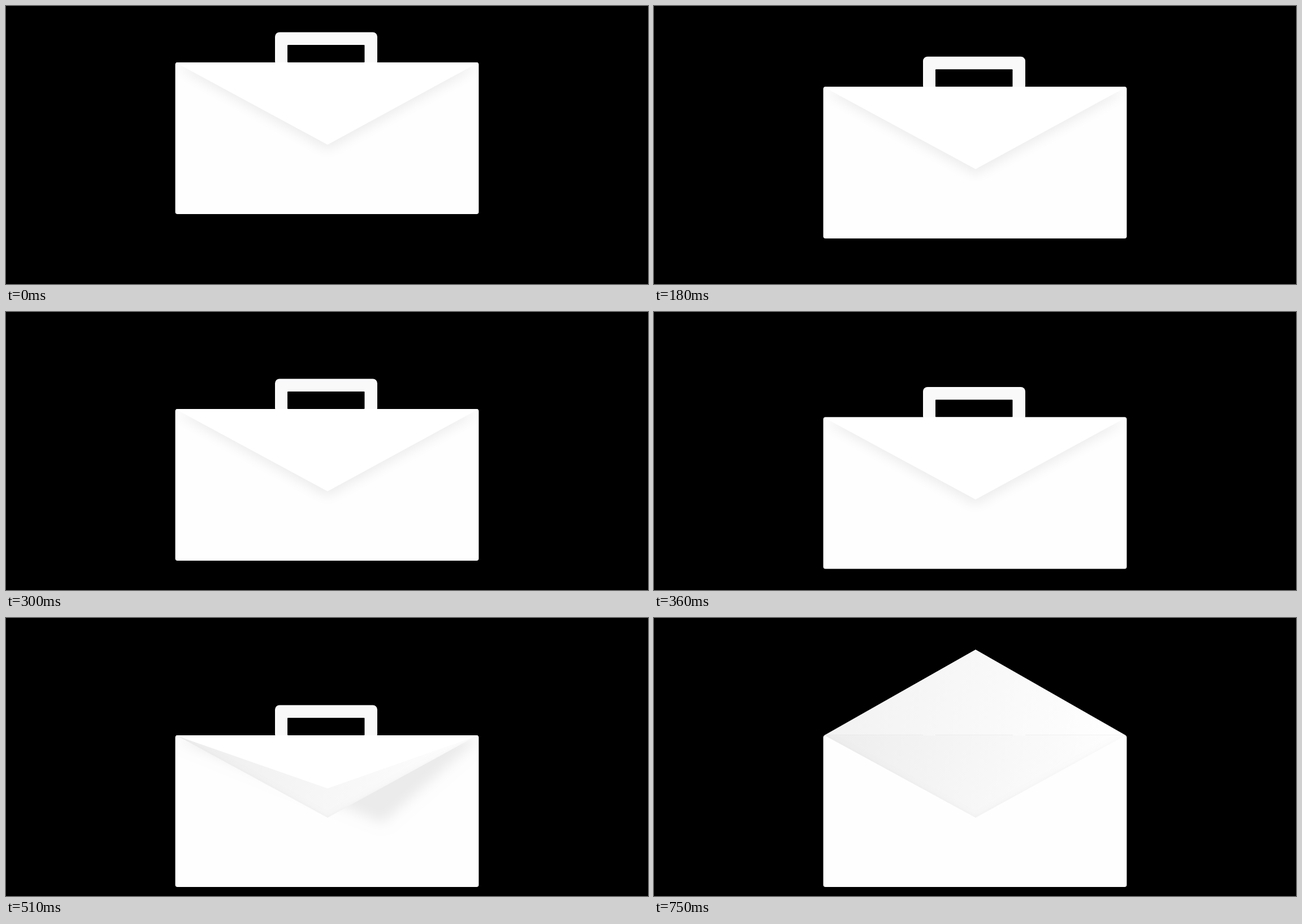
Recreate the animation shown at these times as an HTML page with a canvas. Size 1136 px wide and 493 px high, loop 1350 ms.

```html
<!DOCTYPE html>
<html lang="en">
<head>
<meta charset="utf-8">
<title>Envelope</title>
<style>
html, body { margin: 0; width: 100%; height: 100%; overflow: hidden; background: #000; }
canvas { display: block; }
</style>
</head>
<body>
<canvas id="stage" width="1136" height="493"></canvas>
<script>
const ctx = document.getElementById('stage').getContext('2d');
const LOOP = 1350, STEP = 30, LAST = 750;
const DROP_END = 450, OPEN_TIME = 300;
const L = 299.5, R = 836.5, MID = 569, BODY_H = 269, FOLD = 146;
const FAR = 3000; // shadow casters are drawn this far off stage

// cubic-bezier(.25, .1, .25, 1), solved by bisection
function ease(x) {
  if (x <= 0) return 0;
  if (x >= 1) return 1;
  const curve = (a, b, u) => 3 * a * u * (1 - u) ** 2 + 3 * b * u * u * (1 - u) + u ** 3;
  let lo = 0, hi = 1;
  for (let i = 0; i < 30; i++) {
    const u = (lo + hi) / 2;
    if (curve(.25, .25, u) < x) lo = u; else hi = u;
  }
  return curve(.1, 1, lo);
}

function poly(...pts) {
  ctx.beginPath();
  pts.forEach(([x, y]) => ctx.lineTo(x, y));
  ctx.closePath();
}

function box(x, y, w, h, r) {
  ctx.beginPath();
  ctx.roundRect(x, y, w, h, r);
}

function paint(color) {
  ctx.fillStyle = color;
  ctx.fill();
}

function shade(top, from, to) {
  const g = ctx.createLinearGradient(300, top, 785, top + 153);
  g.addColorStop(0, from);
  g.addColorStop(1, to);
  return g;
}

function castShadow(blur, alpha) {
  ctx.shadowColor = `rgba(0,0,0,${alpha})`;
  ctx.shadowBlur = blur;
  ctx.shadowOffsetX = FAR;
  paint('#000');
}

function clipped(path, draw) {
  ctx.save();
  path();
  ctx.clip();
  draw();
  ctx.restore();
}

function drawHandle(top) {
  box(476, top - 53.5, 181, 60, 8);
  paint('#f9f9fa');
  box(498, top - 31, 136.5, 31, 1);
  paint('#000');
}

function drawPocket(top, p, closed) {
  const body = () => box(L, top, R - L, BODY_H, 4);
  body();
  paint('#fefefe');
  if (closed) {
    clipped(body, () => {
      poly([L - FAR, top + 6], [R - FAR, top + 6], [MID + 330 * p - FAR, top + 155]);
      castShadow(21, .075);
    });
  }
  if (p === 0) return;

  const hollow = () => poly([L + 2, top], [R - 2, top], [MID, top + FOLD]);
  hollow();
  paint(shade(top, '#ededed', '#fefefe'));
  clipped(hollow, () => {
    poly([L - FAR, top], [MID - FAR, top + FOLD], [R - FAR, top],
      [R - FAR, top + BODY_H], [L - FAR, top + BODY_H]);
    castShadow(8, .04);
  });
}

function drawFlap(top, p, angle) {
  const h = FOLD + 6 * p;
  const zoom = 2000 / (2000 - h * Math.sin(angle));
  const tip = top + h * Math.cos(angle) * zoom;
  const open = tip < top;
  if (open) {
    poly([L + 1, top + .5], [MID, tip], [R - 1, top + .5]);
    paint(shade(top, '#f2f2f2', '#fff'));
    ctx.fillStyle = 'rgba(0,0,0,.05)';
    for (const [a, b] of [[303, 476], [498, 635], [657, 833]]) {
      ctx.fillRect(a, top - 1, b - a, 1);
    }
  } else {
    clipped(() => box(L, top, R - L, BODY_H, 4), () => {
      poly([L, top], [R, top], [MID, tip]);
      paint('#fff');
    });
  }
}

function draw(ms) {
  const t = Math.min(LAST, Math.floor((ms % LOOP) / STEP) * STEP);
  const top = 100 + .24 * Math.min(t, DROP_END);
  const p = ease((t - DROP_END) / OPEN_TIME);
  const angle = Math.PI * p;
  ctx.fillStyle = '#000';
  ctx.fillRect(0, 0, 1136, 493);
  drawHandle(top);
  drawPocket(top, p, p < .5);
  drawFlap(top, p, angle);
}

let start = null;
function tick(now) {
  if (start === null) start = now;
  draw(Math.max(0, now - start));
  requestAnimationFrame(tick);
}
draw(0);
requestAnimationFrame(tick);
</script>
</body>
</html>
```
